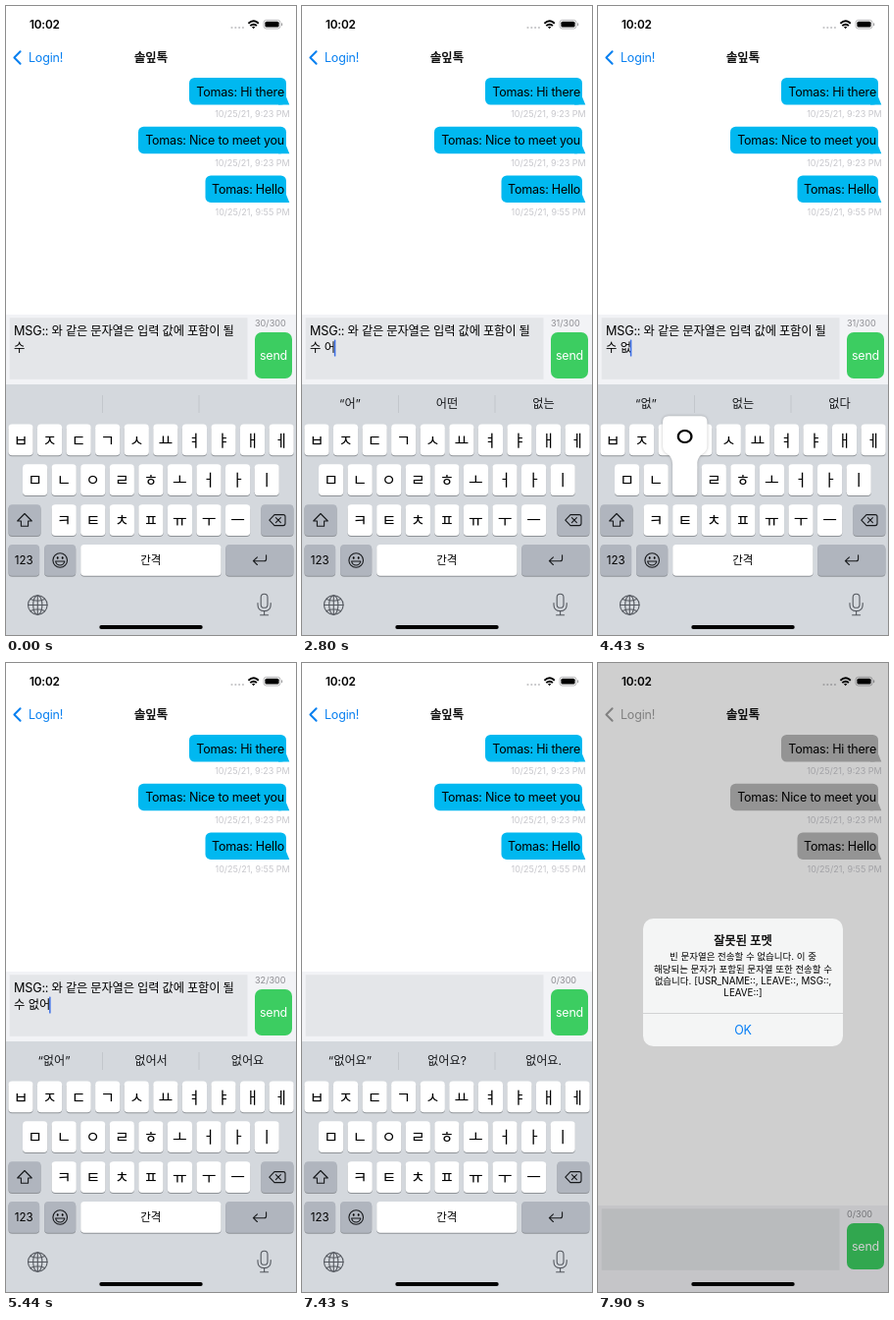
These frames come from a looping animation (296x640 px, 8 s). An HTML page:

```html
<!DOCTYPE html>
<html lang="ko">
<head>
<meta charset="utf-8">
<title>Chat input check</title>
<style>
html, body { margin: 0; width: 100%; height: 100%; overflow: hidden; background: #fff; }
svg { display: block; width: 296px; height: 640px; }
text { font-family: Inter, 'Noto Sans CJK KR', 'Noto Sans CJK', sans-serif; white-space: pre; }
.ko { font-family: 'Noto Sans CJK KR', 'Noto Sans CJK', sans-serif; }
.ko tspan { font-family: Inter, sans-serif; font-size: 1.03em; }
.semi { stroke: #000; stroke-width: .4px; }
.t { letter-spacing: -.2px; }
.m { text-anchor: middle; }
.e { text-anchor: end; }
.i { fill: none; stroke: #16181b; stroke-width: 1.1; stroke-linecap: round; stroke-linejoin: round; }
.g { stroke: #54585f; }
#pop path { filter: drop-shadow(0 .5px 1.5px rgba(0,0,0,.25)); }
</style>
</head>
<body>
<svg id="stage" viewBox="0 0 296 640"></svg>
<script>
const LOOP = 8000;
const BLUE = [10, 128, 240], CYAN = [0, 184, 240];

// ---- markup helpers ----
const text = (x, y, size, s, cls = '', fill = '#000', more = '') =>
  `<text x="${x}" y="${y}" font-size="${size}" class="${cls}" fill="${fill}" ${more}>${s}</text>`;
const rect = (x, y, w, h, r, fill, more = '') =>
  `<rect x="${x}" y="${y}" width="${w}" height="${h}" rx="${r}" fill="${fill}" ${more}/>`;
const icon = (d, cls = '', more = '') => `<path class="i ${cls}" d="${d}" ${more}/>`;
// Latin runs inside Korean text get the Latin face
const mix = s => s.replace(/[^\u3131-\u318e\uac00-\ud7a3 ]+( [^\u3131-\u318e\uac00-\ud7a3 ]+)*/g, '<tspan>$&</tspan>');

// ---- chat page ----
function bubble(left, y, msg, time) {
  return rect(left, y, 286 - left, 27.5, 5.5, 'currentColor') +
    `<path fill="currentColor" d="M286 ${y + 19.5}L289.3 ${y + 27.5}H278V${y + 19.5}Z"/>` +
    text(284, y + 18.5, 12.5, 'Tomas: ' + msg, 't e') +
    text(289.7, y + 40.4, 9, time, 'e', '#c7c7cc');
}

function statusBar() {
  let s = text(24, 23, 11.8, '10:02', 't', '#000', 'font-weight="600"');
  for (let i = 0; i < 4; i++) s += `<circle cx="${230.5 + i * 3.8}" cy="22" r="1.1" fill="#c4c4c6"/>`;
  s += `<g fill="none" stroke="#000" stroke-width="1.9">
    <path d="M247.4 17.7Q252.6 13 257.8 17.7"/><path d="M249.3 20.1Q252.6 17.2 255.9 20.1"/></g>
    <path d="M250.9 21.3Q252.6 20 254.3 21.3L252.6 23.2Z"/>`;
  s += rect(263, 14.3, 17, 8.7, 2.6, 'none', 'stroke="#a5a5a7" stroke-width=".8"') +
    rect(264.4, 15.7, 14.2, 5.9, 1.5, '#000') + rect(281, 17.2, 1.2, 3, .6, '#a5a5a7');
  return s;
}

const page = rect(0, 0, 296, 640, 0, '#fff') + statusBar() +
  `<g id="back"><path d="M14.6 46.3L8.4 52.5L14.6 58.7" fill="none" stroke="currentColor" stroke-width="2" stroke-linecap="round" stroke-linejoin="round"/>` +
  text(23, 57.2, 12.5, 'Login!', 't', 'currentColor') + '</g>' +
  text(148, 57, 12.3, '솔잎톡', 'ko m semi') +
  '<g id="chat">' +
  bubble(187, 73, 'Hi there', '10/25/21, 9:23 PM') +
  bubble(135, 122.7, 'Nice to meet you', '10/25/21, 9:23 PM') +
  bubble(203.5, 172.4, 'Hello', '10/25/21, 9:55 PM') + '</g>';

const inputBar = '<g id="bar">' + rect(0, 314, 296, 600, 0, '#f2f3f6') +
  rect(3.7, 317.3, 242.8, 62.5, 0, '#e4e6e9') +
  '<g id="draft">' +
  text(8, 335.3, 12.3, mix('MSG:: 와 같은 문자열은 입력 값에 포함이 될'), 'ko t') +
  text(8, 352.2, 12.3, '', 'ko', '#000', 'id="line"') +
  rect(0, 339.5, 1.5, 17, .6, '#3a6ee8', 'id="caret"') + '</g>' +
  text(254, 326, 9.1, '', '', '#8e8e93', 'id="count"') +
  rect(254, 332, 38, 47, 7, '#3ccd61') + text(273, 360, 12.5, 'send', 't m', '#fff') + '</g>';

// ---- keyboard ----
const ROWS = [['ㅂㅈㄷㄱㅅㅛㅕㅑㅐㅔ', 15, 425.5], ['ㅁㄴㅇㄹㅎㅗㅓㅏㅣ', 29.6, 466.3], ['ㅋㅌㅊㅍㅠㅜㅡ', 59.2, 507.2]];
const PITCH = 29.57, KEY_W = 25.2, KEY_H = 31.8;
const keys = {};

const cap = (x, y, w, fill = '#fff') =>
  rect(x, y + 1, w, KEY_H, 3.8, '#8f9398') + rect(x, y, w, KEY_H, 3.8, fill);

function letters() {
  let s = '';
  for (const [row, x0, y] of ROWS)
    [...row].forEach((ch, i) => {
      const x = x0 + i * PITCH;
      keys[ch] = { x, y };
      s += cap(x - KEY_W / 2, y, KEY_W) + text(x, y + 22, 16, ch, 'ko m');
    });
  return s;
}

function keyboard() {
  const dark = '#b0b5be';
  let s = rect(0, 385, 296, 255, 0, '#d4d8dd') +
    rect(98, 396, .8, 18, 0, '#bfc3c9') + rect(196.6, 396, .8, 18, 0, '#bfc3c9');
  [49, 148, 246.5].forEach((x, i) => s += text(x, 409, 12.2, '', 'm', '#17191c', `id="hint${i}"`));
  s += letters();
  s += cap(2.5, 507.2, 33, dark) + cap(260.4, 507.2, 33, dark);
  s += cap(2.5, 548, 31.6, dark) + cap(39.2, 548, 32, dark) + cap(76.2, 548, 143.3) + cap(224.2, 548, 69.2, dark);
  s += text(18.2, 568.3, 11.6, '123', 'm') + text(147.8, 568, 11.5, '간격', 'ko m');
  s += icon('M19 516.5L26.3 524H22.6V529.3H15.4V524H11.7Z');
  s += icon('M274 517.6H283Q285 517.6 285 519.6V526.6Q285 528.6 283 528.6H274L268.8 523.1ZM275.4 520.6L280.4 525.6M280.4 520.6L275.4 525.6');
  s += '<circle class="i" cx="55.2" cy="564" r="7.3"/><ellipse cx="52.7" cy="561.5" rx=".9" ry="1.3"/><ellipse cx="57.7" cy="561.5" rx=".9" ry="1.3"/>' +
    icon('M50.6 565H59.8Q58.9 569 55.2 569Q51.5 569 50.6 565Z');
  s += icon('M265.6 558.7V562.7Q265.6 564.7 263.6 564.7H252.6M256.4 560.9L252.4 564.7L256.4 568.5');
  s += '<circle class="i g" cx="32.3" cy="609.5" r="9.8"/><ellipse class="i g" cx="32.3" cy="609.5" rx="4.6" ry="9.8"/>' +
    icon('M32.3 599.7V619.3M22.5 609.5H42.1M25 603.6Q32.3 607 39.6 603.6M25 615.4Q32.3 612 39.6 615.4', 'g');
  s += '<rect class="i g" x="260.2" y="598.3" width="6.8" height="14" rx="3.4"/>' +
    icon('M257 607.5V609.3Q257 615.6 263.6 615.6Q270.2 615.6 270.2 609.3V607.5M263.6 615.6V619.8M259.6 619.8H267.6', 'g');
  return `<g id="kb">${s}<g id="pop"><path fill="#fff"/>${text(0, 0, 28, '', 'ko m')}</g></g>`;
}

// key preview: wide head flowing into the key
function popPath({ x, y }) {
  const a = x - KEY_W / 2, b = x + KEY_W / 2;
  const l = Math.max(1, x - 22.7), r = Math.min(295, x + 22.7), t = y - 49, e = y + KEY_H;
  return `M${l + 6} ${t}H${r - 6}Q${r} ${t} ${r} ${t + 6}V${y - 19}C${r} ${y - 9} ${b} ${y - 12} ${b} ${y}` +
    `V${e - 4}Q${b} ${e} ${b - 4} ${e}H${a + 4}Q${a} ${e} ${a} ${e - 4}V${y}` +
    `C${a} ${y - 12} ${l} ${y - 9} ${l} ${y - 19}V${t + 6}Q${l} ${t} ${l + 6} ${t}Z`;
}

// ---- alert ----
const body = ['빈 문자열은 전송할 수 없습니다. 이 중', '해당되는 문자가 포함된 문자열 또한 전송할 수',
  '없습니다. [USR_NAME::, LEAVE::, MSG::,', 'LEAVE::]'];
const alertBox = '<g id="alert">' + rect(46, 260, 204, 130, 10.5, '#f4f5f5') +
  text(148, 287.4, 12.2, '잘못된 포멧', 'ko m semi') +
  body.map((s, i) => text(148, 302.2 + i * 12.3, 9.5, mix(s), 'ko m')).join('') +
  rect(46, 356.2, 204, .7, 0, '#c4c4c6') + text(148, 378.4, 12.5, 'OK', 't m', '#067ef6') + '</g>';

const $ = id => document.getElementById(id);
$('stage').innerHTML = page + inputBar + keyboard() +
  rect(0, 0, 296, 640, 0, '#000', 'id="dim"') + alertBox + rect(95.3, 630, 105.4, 3.9, 1.95, '#000');

// ---- timeline ----
// key, press time, release time, text after release, time of new hints, hints
const STROKES = [
  ['ㅇ', 1670, 1780, 'ㅇ', 2000, '“ㅇ”'],
  ['ㅓ', 2460, 2570, '어', 2800, '“어” 어떤 없는'],
  ['ㅂ', 3050, 3170, '업', 3400, '“업” 업무 업체'],
  ['ㅅ', 3660, 3780, '없', 4020, '“없” 없는 없다'],
  ['ㅇ', 4430, 4560, '없ㅇ', 4830, '“없ㅇ” 없어 없이'],
  ['ㅓ', 4970, 5090, '없어', 5330, '“없어” 없어서 없어요'],
  ['ㅇ', 5580, 5700, '없엉', 5950, '“없엉” 없어야 없어요'],
  ['ㅛ', 6210, 6340, '없어요', 6570, '“없어요” 없어요? 없어요.']
];
// caret opacity changes
const CARET = [[0, 0], [140, .5], [260, 1], [870, 0], [1110, .5], [1230, 1], [6990, 0], [7130, .5], [7250, 1]];
const SEND = 7430, ALERT_STEPS = [7430, 7540, 7660, 7780, 7900];

const last = (list, test) => list.filter(test).pop();
const clamp = v => Math.min(1, Math.max(0, v));
const blend = (a, g, p) => `rgb(${a.map(v => Math.round(v + (g - v) * p))})`;

function drawTyping(t) {
  const typed = last(STROKES, s => t >= s[2]);
  const tail = typed ? typed[3] : '';
  $('line').textContent = '수 ' + tail;
  $('caret').setAttribute('x', 21.6 + 11.25 * tail.length);
  $('caret').setAttribute('opacity', last(CARET, c => t >= c[0])[1]);
  $('draft').setAttribute('opacity', t < SEND ? 1 : 0);
  $('count').textContent = (t < SEND ? 30 + tail.length : 0) + '/300';

  const hinted = last(STROKES, s => t >= s[4]);
  const early = !hinted && t >= 1890;
  const words = hinted ? hinted[5].split(' ') : early ? ['“ㅇ'] : [];
  for (let i = 0; i < 3; i++) $('hint' + i).textContent = words[i] || '';
  $('hint0').setAttribute('x', early ? 45 : 49);
  $('hint0').setAttribute('font-size', early ? 10.5 : 12.2);
  $('hint0').setAttribute('opacity', early ? .5 : 1);

  const held = STROKES.find(s => t >= s[1] && t < s[2]);
  const pop = $('pop');
  pop.setAttribute('visibility', held ? 'visible' : 'hidden');
  if (held) {
    const k = keys[held[0]], label = pop.lastElementChild;
    pop.firstElementChild.setAttribute('d', popPath(k));
    label.textContent = held[0];
    label.setAttribute('x', Math.max(k.x, 19));
    label.setAttribute('y', k.y - 17);
  }
}

function drawAlert(t) {
  const u = t < SEND ? 0 : clamp((last(ALERT_STEPS, s => t >= s) - SEND) / 240);
  const p = u * u * (3 - 2 * u);
  const drop = Math.round(237.5 * (1 - Math.pow(1 - u, 1.45)));
  $('bar').setAttribute('transform', `translate(0 ${drop})`);
  $('kb').setAttribute('transform', `translate(0 ${drop})`);
  $('kb').setAttribute('opacity', clamp(1 - 2.5 * p));
  $('back').setAttribute('color', blend(BLUE, 158, p));
  $('chat').setAttribute('color', blend(CYAN, 182, p));
  $('dim').setAttribute('opacity', .19 * p);
  const k = 1.2 - .2 * p;
  $('alert').setAttribute('opacity', p);
  $('alert').setAttribute('transform', `translate(148 325) scale(${k}) translate(-148 -325)`);
}

function frame(now) {
  const t = now % LOOP;
  drawTyping(t);
  drawAlert(t);
}

const start = performance.now();
(function tick() {
  frame(performance.now() - start);
  requestAnimationFrame(tick);
})();
</script>
</body>
</html>
```
